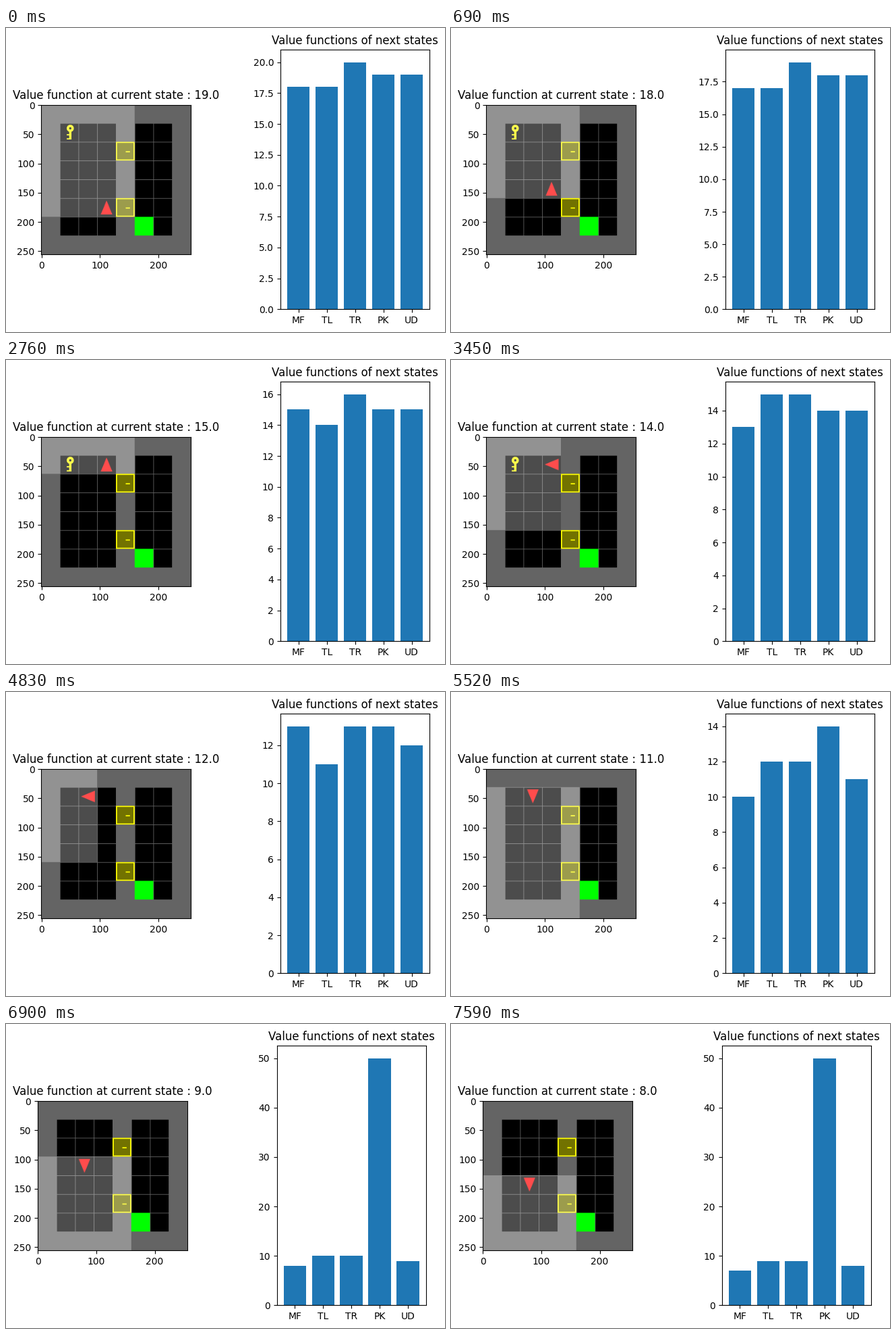
Write a matplotlib script that moves like this. It is 651 by 450 pixels and loops after 8000 ms.

```python
import numpy as np
import matplotlib.pyplot as plt
from matplotlib.animation import FuncAnimation

W, H, DPI = 651, 450, 100
LOOP, INTERVAL, STEP = 8000, 40, 690   # milliseconds
TILE, SUB, CELLS = 32, 3, 8
GREY, YELLOW, GREEN, RED = (100,) * 3, (255, 255, 0), (0, 255, 0), (255, 0, 0)

ACTIONS = ["MF", "TL", "TR", "PK", "UD"]
HEADINGS = [(1, 0), (0, 1), (-1, 0), (0, -1)]   # right, down, left, up
DOORS, GOAL, KEY, INNER_WALL = [(4, 2), (4, 5)], (5, 6), (1, 1), 4
START = (3, 5, 3, False, frozenset())   # column, row, heading, has key, open doors
LOST_VALUE = 50


# ---- the world and its value function ----

def is_wall(c, r):
    return c in (0, INNER_WALL, CELLS - 1) or r in (0, CELLS - 1)


def next_state(state, action):
    """State after an action; None when the key is dropped far from its place."""
    c, r, h, has_key, opened = state
    front = (c + HEADINGS[h][0], r + HEADINGS[h][1])
    if action == "MF":
        blocked = is_wall(*front) and front not in opened
        if not blocked and (has_key or front != KEY):
            return (*front, h, has_key, opened)
    elif action == "TL":
        return (c, r, (h - 1) % 4, has_key, opened)
    elif action == "TR":
        return (c, r, (h + 1) % 4, has_key, opened)
    elif action == "PK":
        if has_key:
            near = abs(c - KEY[0]) + abs(r - KEY[1]) <= 1
            return (c, r, h, False, opened) if near else None
        return (c, r, h, front == KEY, opened)
    elif has_key and front in DOORS:
        return (c, r, h, has_key, opened | {front})
    return state


def solve():
    """Fewest steps to the goal from every reachable state."""
    links, todo = {}, [START]
    while todo:
        s = todo.pop()
        if s is None or s in links:
            continue
        links[s] = [] if s[:2] == GOAL else [next_state(s, a) for a in ACTIONS]
        todo += links[s]
    value = {s: 0 if s[:2] == GOAL else LOST_VALUE for s in links}
    value[None] = LOST_VALUE
    changed = True
    while changed:
        changed = False
        for s, outs in links.items():
            best = min((1 + value[n] for n in outs), default=0)
            if best < value[s]:
                value[s], changed = best, True
    return value


VALUE = solve()


def outcomes(state):
    return [next_state(state, a) for a in ACTIONS]


def walk(count):
    """Follow the best action from the start."""
    path = [START]
    while len(path) < count:
        path.append(min(outcomes(path[-1]), key=VALUE.get))
    return path


# ---- drawing the grid ----

# Unit coordinates of the supersampled tile
N = TILE * SUB
Y, X = (np.mgrid[:N, :N] + 0.5) / N


def rect(x0, x1, y0, y1):
    return (X >= x0) & (X <= x1) & (Y >= y0) & (Y <= y1)


def circle(cx, cy, r):
    return (X - cx) ** 2 + (Y - cy) ** 2 <= r * r


def draw_door(t):
    t[:] = YELLOW
    t[rect(0.06, 0.94, 0.06, 0.94)] = [int(0.45 * c) for c in YELLOW]
    t[rect(0.52, 0.75, 0.50, 0.56)] = YELLOW


def draw_key(t):
    t[rect(0.50, 0.63, 0.31, 0.88)] = YELLOW
    t[rect(0.38, 0.50, 0.59, 0.66)] = YELLOW
    t[rect(0.38, 0.50, 0.81, 0.88)] = YELLOW
    t[circle(0.56, 0.28, 0.19)] = YELLOW
    t[circle(0.56, 0.28, 0.064)] = 0


def draw_agent(t, heading):
    tri = (X >= 0.12) & (np.abs(Y - 0.5) <= 0.31 * (0.87 - X) / 0.75)
    t[np.rot90(tri, -heading)] = RED


def in_view(c, r, ac, ar, heading):
    """Seven by seven cells ahead of the agent, cut off by the inner wall."""
    dx, dy = HEADINGS[heading]
    ahead = (c - ac) * dx + (r - ar) * dy
    side = (c - ac) * dy - (r - ar) * dx
    return c <= INNER_WALL and 0 <= ahead <= 6 and abs(side) <= 3


def render_tile(c, r, state):
    t = np.zeros((N, N, 3))
    t[rect(0, 0.031, 0, 1) | rect(0, 1, 0, 0.031)] = GREY
    if (c, r) in DOORS:
        draw_door(t)
    elif is_wall(c, r):
        t[:] = GREY
    elif (c, r) == GOAL:
        t[:] = GREEN
    elif (c, r) == KEY and not state[3]:
        draw_key(t)
    if (c, r) == state[:2]:
        draw_agent(t, state[2])
    if in_view(c, r, *state[:3]):
        t = np.floor(t + 0.3 * (255 - t))
    return t.reshape(TILE, SUB, TILE, SUB, 3).mean(axis=(1, 3))


def render_grid(state):
    rows = [np.hstack([render_tile(c, r, state) for c in range(CELLS)])
            for r in range(CELLS)]
    return np.vstack(rows).astype(np.uint8)


# ---- the figure ----

PATH = walk(-(-LOOP // STEP))
GRIDS = [render_grid(s) for s in PATH]
BARS = [[VALUE[n] for n in outcomes(s)] for s in PATH]

SIDE, TALL, BOTTOM = 221.5, 384.1, 33.6   # pixels, measured from the bottom left
LEFT_X, RIGHT_X = 52.4, 406.87


def place(shift):
    boxes = [(grid_ax, LEFT_X, BOTTOM + (TALL - SIDE) / 2, SIDE),
             (bar_ax, RIGHT_X, BOTTOM, TALL)]
    for ax, x, y, h in boxes:
        ax.set_position([(x - shift) / W, y / H, SIDE / W, h / H])


plt.rcParams["font.family"] = "DejaVu Sans"
fig, (grid_ax, bar_ax) = plt.subplots(1, 2, figsize=(W / DPI, H / DPI), dpi=DPI,
                                      facecolor="white")
picture = grid_ax.imshow(GRIDS[0])
title = grid_ax.set_title("")
bars = bar_ax.bar(ACTIONS, BARS[0], color="#1f77b4")
bar_ax.set_title("Value functions of next states")


def update(i):
    k = ((i + 1) * INTERVAL - 1) // STEP
    value = VALUE[PATH[k]]
    # a one-digit value narrows the title and pulls the layout left
    place(5.35 if value < 10 else 0)
    picture.set_data(GRIDS[k])
    title.set_text(f"Value function at current state : {value:.1f}")
    for bar, h in zip(bars, BARS[k]):
        bar.set_height(h)
    bar_ax.set_ylim(0, 1.05 * max(BARS[k]))
    return [picture, title, *bars]


anim = FuncAnimation(fig, update, frames=LOOP // INTERVAL, interval=INTERVAL,
                     repeat=True, repeat_delay=0, blit=False)
plt.show()
```
